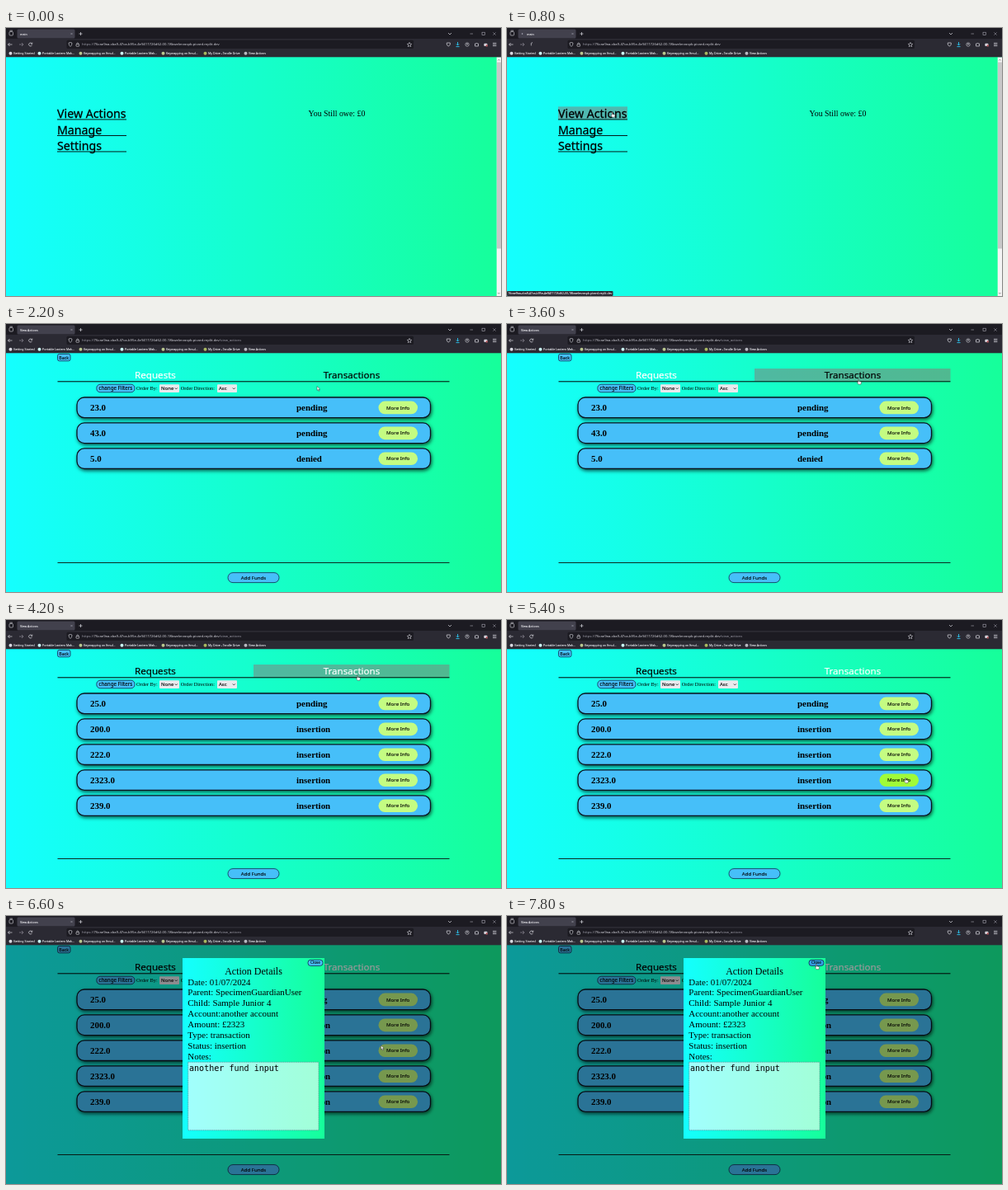
An HTML page for the animation above (8 s loop, 600x325 px).

```html
<!DOCTYPE html>
<html lang="en">
<head>
<meta charset="utf-8">
<title>View Actions</title>
<style>
  html, body { margin: 0; width: 100%; height: 100%; overflow: hidden; }
  svg { display: block; width: 100%; height: 100%; }
  text { white-space: pre; }
  .sans { font-family: "Noto Sans", "Open Sans", sans-serif; }
  .serif { font-family: "Liberation Serif", serif; }
  .mono { font-family: "DejaVu Sans Mono", monospace; }
  .bold { font-weight: bold; }
  .card { filter: drop-shadow(1px 2px 2px rgba(0, 0, 0, .65)); }
</style>
</head>
<body>
<svg viewBox="0 0 600 325" preserveAspectRatio="none">
  <defs>
    <linearGradient id="aqua">
      <stop offset="0" stop-color="#14ffff"/>
      <stop offset="1" stop-color="#16ff9a"/>
    </linearGradient>
  </defs>
  <g id="scene"></g>
</svg>
<script>
const LOOP = 8000, STEP = 200;
const PAGE_LOADED = 1000, TAB_SWITCHED = 4000, DETAILS_OPEN = 5600;
const BLUE = '#46bff9', ICON = '#d8d8e0', DIM_ICON = '#a9a8b4';
const HOST = '76cae9aa-cba9-47ca-b95e-4e9411726d62-00-18bwelerzaspb.picard.replit.dev';
const scene = document.getElementById('scene');

// Cursor stops: time, x, y
const PATH = [
  [200, 190, 62], [600, 127, 102], [1000, 127, 102], [2200, 377, 75.5],
  [2600, 377, 75.5], [3400, 425.5, 67], [4200, 425.5, 67], [5200, 482.5, 191.5],
  [6200, 482.5, 191.5], [7400, 374.5, 58.5], [LOOP, 374.5, 58.5]
];

// Sans text gets a hairline outline for a slightly heavier weight.
const text = (x, y, size, str, { cls = 'sans', fill = '#000', anchor = 'start' } = {}) =>
  `<text x="${x}" y="${y}" font-size="${size}" class="${cls}" fill="${fill}" text-anchor="${anchor}"` +
  (cls === 'sans' ? ` stroke="${fill}" stroke-width="${size * .018}"` : '') + `>${str}</text>`;
const rect = (x, y, w, h, fill, r = 0, extra = '') =>
  `<rect x="${x}" y="${y}" width="${w}" height="${h}" rx="${r}" fill="${fill}" ${extra}/>`;
const path = (d, stroke = ICON, width = .7, fill = 'none') =>
  `<path d="${d}" stroke="${stroke}" stroke-width="${width}" fill="${fill}" stroke-linejoin="round"/>`;
const circle = (x, y, r, fill, extra = '') =>
  `<circle cx="${x}" cy="${y}" r="${r}" fill="${fill}" ${extra}/>`;
const ring = (x, y, r) => circle(x, y, r, 'none', `stroke="${ICON}" stroke-width=".6"`);
const cross = (x, y, r) =>
  path(`M${x - r} ${y - r}l${2 * r} ${2 * r}M${x + r} ${y - r}l${-2 * r} ${2 * r}`, DIM_ICON, .5);
const button = (x, y, w, h, r, label, size, fill = BLUE) =>
  rect(x, y, w, h, fill, r, 'stroke="#102a50" stroke-width=".8"') +
  text(x + w / 2, y + h / 2 + size * .36, size, label, { anchor: 'middle' });

function cursorAt(t) {
  if (t < PATH[0][0]) return null;
  const i = PATH.findIndex(stop => stop[0] > t);
  const [t0, x0, y0] = PATH[i - 1], [t1, x1, y1] = PATH[i];
  const p = (t - t0) / (t1 - t0), e = p * p * (3 - 2 * p);
  return { x: x0 + (x1 - x0) * e, y: y0 + (y1 - y0) * e };
}

function drawCursor({ x, y }, hand) {
  const shape = hand
    ? 'M0 0q.9-.5 1 .5v1.9l2.4.5q.7.2.6 1l-.5 2.3h-3l-1.7-2.2q-.1-.8.8-.4l.4.3z'
    : 'M0 0v5l1.2-1.1.9 2 .9-.4-.9-1.9h1.6z';
  return `<g transform="translate(${x} ${y})">${path(shape, '#222', .45, '#fff')}</g>`;
}

function browser(loaded, loading) {
  const bookmarks = [
    [5.5, '#d8d8e0', 'Getting Started'], [40.5, '#c9f5f2', 'Portable Lantern Mak...'],
    [90.5, '#b9c78e', 'Keymapping on Emul...'], [140.5, '#c9f5f2', 'Portable Lantern Mak...'],
    [190.5, '#b9c78e', 'Keymapping on Emul...'], [241.5, '#a8b860', 'My Drive - Tandle Drive'],
    [290.5, '#b8b8c0', 'View Actions']
  ];
  const light = { fill: '#f2f2f6' };
  return rect(0, 0, 600, 13, '#1c1b22') + rect(0, 13, 600, 22.3, '#2b2a33') +
    rect(13.5, 1.5, 70, 11, '#42414d', 1.5) +
    rect(4, 4.5, 4.5, 4.5, 'none', 1, `stroke="${ICON}" stroke-width=".6"`) + path('M4.5 3.2h3.5') +
    (loading ? circle(18.5, 7, .8, '#b8b8c4') : '') +
    text(loading ? 24 : 17, 8.6, 3.7, loaded ? 'View Actions' : 'main', light) +
    cross(79.5, 7, 1.1) + path('M88.5 7h4M90.5 5v4') +
    path('M536 6l2 2 2-2') + path('M562.5 7h3.5', DIM_ICON, .6) +
    rect(577, 5.2, 3.4, 3.4, 'none', 0, `stroke="${DIM_ICON}" stroke-width=".6"`) + cross(592, 7, 1.7) +
    path('M7.5 20h-5m2-2l-2 2 2 2') + path('M16 20h5m-2-2l2 2-2 2', '#8a8993') +
    path(loading ? 'M29.3 21.4v-2.8q.2-.9 1.7-.8' : 'M31.4 19a2 2 0 1 0 .1 1.8M31.8 17.6v1.7h-1.7') +
    rect(73.5, 14.8, 420.5, 10.2, '#1c1b22', 1.5) +
    path('M76 18q1.2 0 2-.8 .8.8 2 .8q0 3.5-2 4.5q-2-1-2-4.5z', ICON, .6) +
    rect(85, 19.6, 3.6, 2.6, 'none', .4, `stroke="${ICON}" stroke-width=".6"`) +
    path('M85.7 19.6v-1q1.1-1.6 2.2 0v1', ICON, .6) +
    `<text x="92" y="21.4" font-size="4.23" class="sans" fill="#9b9aa6">https://<tspan fill="#d4d4dc">${HOST}</tspan>${loaded ? '/view_actions' : ''}</text>` +
    path('M489 17.5l.8 1.7 1.9.2-1.4 1.3.4 1.9-1.7-1-1.7 1 .4-1.9-1.4-1.3 1.9-.2z', ICON, .6) +
    path('M534.3 18h4v2q-2 4-4 0z') + path('M547.5 17v4m-1.6-1.6l1.6 1.6 1.6-1.6M545.5 22.6h4', '#2cc9f4', .9) +
    ring(559, 20, 2.2) + circle(559, 19.5, .8, ICON) +
    path('M568.5 22v-3h1.2q.8-2 1.6 0h1.2v3z') +
    rect(579.4, 18.8, 4, 3.2, ICON, .8) + rect(581.6, 20.2, 2.2, 2.2, '#b8575c', .5) +
    path('M590 18.3h4.4M590 20h4.4M590 21.7h4.4') +
    bookmarks.map(([x, color, label]) => circle(x, 30.7, 2, color) + text(x + 3.6, 32, 3.55, label, light)).join('');
}

function home(hovered) {
  return (hovered ? rect(62, 95.3, 84, 15.7, 'rgba(128,128,128,.55)') : '') +
    ['View Actions', 'Manage', 'Settings'].map((label, i) => {
      const y = 109.3 + i * 19.5;
      return text(62, y, 14.2, label) + rect(62, y + 1.2, 84, .9, '#000');
    }).join('') +
    text(366.6, 107.3, 9.85, 'You Still owe: £0', { cls: 'serif' }) +
    rect(594.7, 35.3, 5.3, 289.7, '#f4f4f4') + rect(595, 41.5, 5, 226, '#c8c8c8') +
    path('M596.2 39.5l1.2-1.3 1.2 1.3M596.2 321l1.2 1.3 1.2-1.3', '#555', .6) +
    (hovered ? rect(0, 319, 128.5, 6, '#2b2a33', 1) + text(1.2, 323.3, 3.5, HOST, { fill: '#f2f2f6' }) : '');
}

function select(x, label) {
  return rect(x, 73.2, 24, 9.8, '#e9e9ed', 1) + text(x + 2, 80.2, 6, label) +
    path(`M${x + 18.8} 77.4l1.5 1.6 1.5-1.6`, '#111', .7);
}

function row(i, amount, status, hovered) {
  const y = 89 + i * 30.95, bold = { cls: 'serif bold' };
  return rect(86, y, 428.5, 24.6, BLUE, 9, 'class="card" stroke="#0a1420" stroke-width="1.3"') +
    text(102, y + 15.7, 10.9, amount, bold) + text(352, y + 15.7, 10.9, status, bold) +
    rect(451.5, y + 4.6, 47.5, 15.6, hovered ? '#a0fb38' : '#c4fc82', 7.8) +
    text(475.2, y + 14.5, 6.1, 'More Info', { anchor: 'middle' });
}

function actions(switched, hover) {
  const rows = switched
    ? [['25.0', 'pending'], ['200.0', 'insertion'], ['222.0', 'insertion'], ['2323.0', 'insertion'], ['239.0', 'insertion']]
    : [['23.0', 'pending'], ['43.0', 'pending'], ['5.0', 'denied']];
  const tab = (x, label, active) =>
    text(x, 66.4, 11.6, label, { anchor: 'middle', fill: active ? '#fff' : '#000' });
  return button(62.5, 36.4, 15.5, 8.4, 2.2, 'Back', 5.3) +
    (hover.tab ? rect(300, 54, 237.5, 15.5, 'rgba(128,128,128,.55)') : '') +
    tab(181, 'Requests', !switched) + tab(419, 'Transactions', switched) +
    rect(62.5, 69.3, 475, 1, '#000') +
    button(109.8, 73.2, 46.2, 9.6, 4.4, 'change Filters', 6.2) +
    text(158, 80.2, 6.4, 'Order By:', { cls: 'serif' }) + select(186, 'None') +
    text(211.8, 80.2, 6.2, 'Order Direction:', { cls: 'serif' }) + select(256, 'Asc') +
    rows.map(([amount, status], i) => row(i, amount, status, hover.row === i)).join('') +
    rect(62.5, 289, 475, 1, '#0a2a20') +
    button(269, 301.6, 62, 12, 6, 'Add Funds', 6.1);
}

function details(closeHovered) {
  const lines = ['Date: 01/07/2024', 'Parent: SpecimenGuardianUser', 'Child: Sample Junior 4',
    'Account:another account', 'Amount: £2323', 'Type: transaction', 'Status: insertion', 'Notes:'];
  return rect(0, 35, 600, 290, 'rgba(0,0,0,.4)') +
    rect(214, 51, 172, 219, 'url(#aqua)') +
    button(366, 53.2, 18, 7.2, 3.2, 'Close', 4.7, closeHovered ? '#339ee6' : BLUE) +
    text(300, 71, 12, 'Action Details', { cls: 'serif', anchor: 'middle' }) +
    lines.map((line, i) => text(220.3, 83.6 + i * 12.85, 10.95, line, { cls: 'serif' })).join('') +
    rect(220.7, 177.2, 158.3, 82.6, 'rgba(255,255,255,.6)', 0,
      'stroke="#557" stroke-width=".6" stroke-dasharray="1 .8"') +
    text(222, 188, 10.05, 'another fund input', { cls: 'mono' });
}

function hoverState(cursor, t) {
  if (!cursor) return {};
  const { x, y } = cursor;
  const within = (left, top, right, bottom) => x >= left && x <= right && y >= top && y <= bottom;
  if (t < PAGE_LOADED) return { menu: within(62, 95, 146, 111) };
  if (t >= DETAILS_OPEN) return { close: within(366, 53, 384, 61) };
  const rowIndex = Math.floor((y - 89) / 30.95);
  const onRow = t >= TAB_SWITCHED && x > 451 && x < 499 && y - 89 - rowIndex * 30.95 < 20.5;
  return { tab: within(300, 54, 537, 69.5), row: onRow ? rowIndex : -1 };
}

function draw(t) {
  const loaded = t >= PAGE_LOADED, open = t >= DETAILS_OPEN;
  const cursor = cursorAt(t), hover = hoverState(cursor, t);
  const hand = hover.menu || hover.tab || hover.row >= 0 || hover.close || (open && t <= 6200);
  scene.innerHTML = rect(0, 35, 600, 290, 'url(#aqua)') +
    (loaded ? actions(t >= TAB_SWITCHED, hover) : home(hover.menu)) +
    (open ? details(hover.close) : '') +
    browser(loaded, t >= 600 && !loaded) +
    (cursor ? drawCursor(cursor, hand) : '');
}

let shown = -1;
function tick() {
  const step = Math.floor(performance.now() % LOOP / STEP);
  if (step !== shown) draw((shown = step) * STEP);
  requestAnimationFrame(tick);
}
tick();
</script>
</body>
</html>
```
